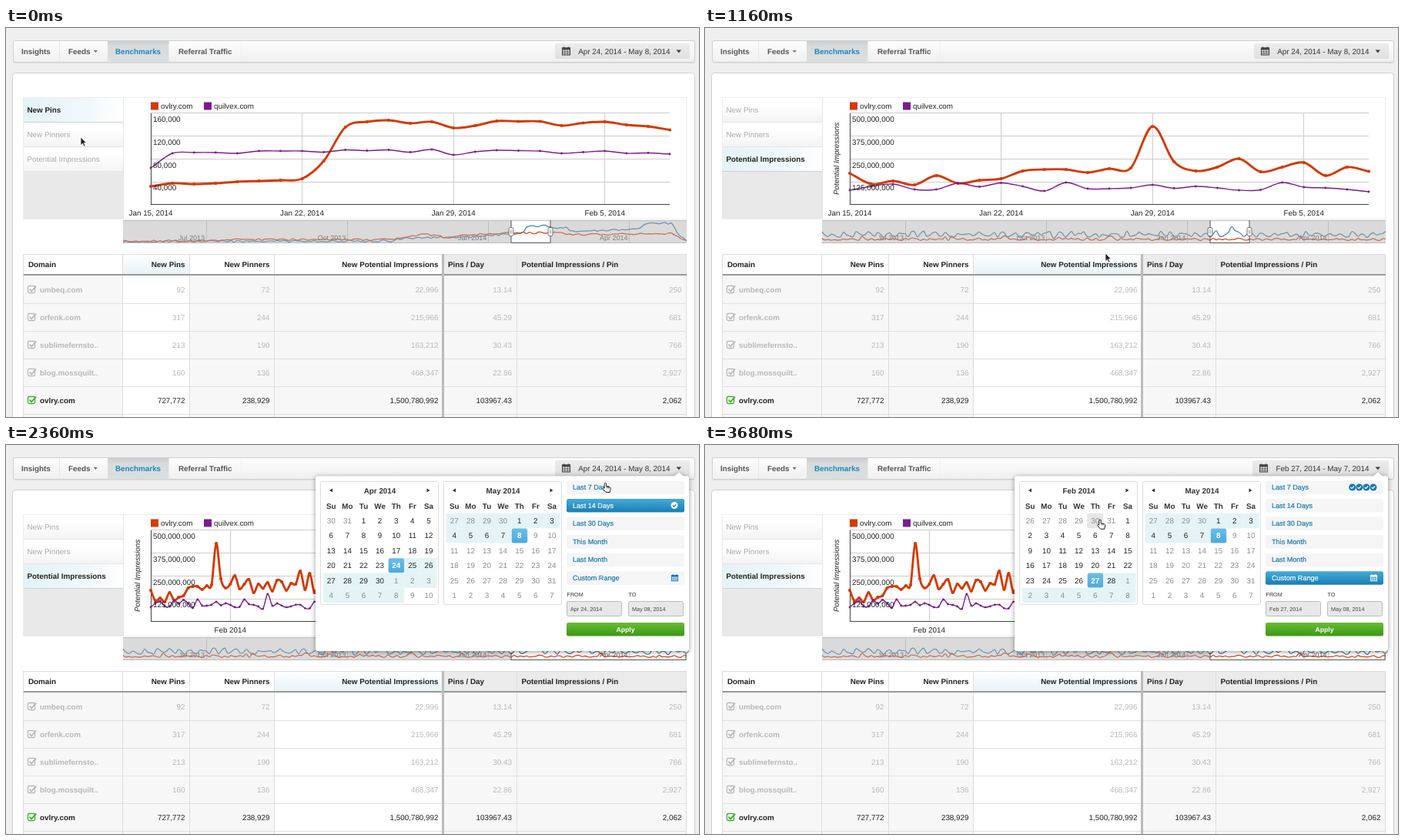
Recreate the animation shown at these times as an HTML page. Size 900 by 506 pixels, loop 3720 ms.

```html
<!DOCTYPE html>
<html lang="en">
<head>
<meta charset="utf-8">
<title>Benchmarks</title>
<style>
html, body { margin: 0; width: 100%; height: 100%; overflow: hidden; background: #efefef; }
svg { display: block; font: 9.85px "Liberation Sans", Arial, sans-serif; text-rendering: geometricPrecision; }
text { white-space: pre; }
.pop { filter: drop-shadow(0 1px 3px rgba(0, 0, 0, .4)); }
</style>
</head>
<body>
<svg id="stage" width="900" height="506" viewBox="0 0 900 506">
  <defs>
    <linearGradient id="bar" x2="0" y2="1"><stop stop-color="#fdfdfd"/><stop offset="1" stop-color="#f0f0f0"/></linearGradient>
    <linearGradient id="tab" x2="0" y2="1"><stop stop-color="#c9cdcf"/><stop offset=".25" stop-color="#d8dbdc"/><stop offset="1" stop-color="#dcdfe0"/></linearGradient>
    <linearGradient id="item" x2="0" y2="1"><stop offset=".3" stop-color="#fff"/><stop offset="1" stop-color="#f4f4f4"/></linearGradient>
    <linearGradient id="pick"><stop stop-color="#e3f3f8"/><stop offset=".65" stop-color="#f1f8fc"/><stop offset="1" stop-color="#fff"/></linearGradient>
    <linearGradient id="head" x2="0" y2="1"><stop stop-color="#fff"/><stop offset="1" stop-color="#e6f3f8"/></linearGradient>
    <linearGradient id="button" x2="0" y2="1"><stop stop-color="#ececec"/><stop offset="1" stop-color="#e0e0e0"/></linearGradient>
    <linearGradient id="cell" x2="0" y2="1"><stop stop-color="#6abfe9"/><stop offset="1" stop-color="#4fa9dc"/></linearGradient>
    <linearGradient id="blue" x2="0" y2="1"><stop stop-color="#45acd9"/><stop offset="1" stop-color="#1a7db3"/></linearGradient>
    <linearGradient id="green" x2="0" y2="1"><stop stop-color="#69bd35"/><stop offset="1" stop-color="#3b9714"/></linearGradient>
  </defs>
  <g id="page"></g><g id="menu"></g><g id="chart"></g><g id="mini"></g>
  <g id="table"></g><g id="date"></g><g id="picker"></g><g id="cursor"></g>
</svg>
<script>
const LOOP = 3720, STEP = 40;
const X0 = 188, X1 = 862, ORANGE = '#d43a05', PURPLE = '#7b1b8e';
const SITES = ['ovlry.com', 'quilvex.com'];
const MENU = ['New Pins', 'New Pinners', 'Potential Impressions'];
const MONTHS = ['Jan', 'Feb', 'Mar', 'Apr', 'May'];

// drawing helpers
const rect = (x, y, w, h, fill, more = '') => `<rect x="${x}" y="${y}" width="${w}" height="${h}" fill="${fill}" ${more}/>`;
const line = (x1, y1, x2, y2, stroke, w = 1) => `<path d="M${x1} ${y1}L${x2} ${y2}" stroke="${stroke}" stroke-width="${w}"/>`;
const path = (d, stroke, w, more = '') => `<path d="${d}" fill="none" stroke="${stroke}" stroke-width="${w}" ${more}/>`;
const shape = (d, fill, more = '') => `<path d="${d}" fill="${fill}" ${more}/>`;
const text = (x, y, s, fill = '#333', more = '') => `<text x="${x}" y="${y}" fill="${fill}" ${more}>${s}</text>`;
const BOLD = 'font-weight="bold" ', END = 'text-anchor="end" ', MID = 'text-anchor="middle" ';
const size = n => `font-size="${n}" `;
const snap = v => Math.floor(v) + .5;
const lerp = (a, b, p) => a + (b - a) * p;
const clamp = p => Math.max(0, Math.min(1, p));
const rnd = (i, seed) => { const v = Math.sin(i * 127.1 + seed * 311.7) * 43758.5453; return v - Math.floor(v); };

const shown = {};
function put(id, html) {
  if (shown[id] !== html) document.getElementById(id).innerHTML = shown[id] = html;
}

// series, as heights on the stage, one value a day
const pinsA = [206, 202, 203, 202, 200, 199, 198, 196, 173, 129, 122, 120, 124, 122, 130, 127, 121, 121.5, 121.5, 127, 123.5, 122, 126, 128, 132.5];
const pinsB = [182, 163, 162, 162, 163, 160, 160, 160, 161.5, 158.5, 159.5, 158.5, 161.5, 158, 165, 161, 159, 159.5, 160, 163, 161.5, 160, 163, 162.5, 164];
const folkA = [203, 198, 200, 199, 197, 196, 194.5, 193, 170, 133, 125, 121.5, 126.5, 124, 130.5, 129, 125, 124, 122, 129, 125, 124.5, 128, 127.5, 133];
const folkB = [190, 177, 177, 178.5, 178, 175.5, 175.5, 175, 176, 174.5, 175.5, 174.5, 175.5, 173, 178, 177, 175.5, 176, 175.5, 177.5, 176.5, 175, 178, 177.5, 179];
const viewA = [189, 203, 199, 204, 192, 202, 198, 196, 186, 184, 184, 188, 183, 182, 128, 174, 186, 181, 170, 187, 181, 175, 192, 181, 186.5];
const viewB = [211, 206, 203, 210, 210, 202, 206.5, 201.5, 206, 212, 201, 209, 209, 208, 204, 208.5, 206, 208, 211, 210.5, 201, 207, 208, 210, 213];
viewA.push(179, 190, 176, 178, 189, 180, 181, 164, 188, 167, 192, 178, 188, 174, 178, 158, 190, 169, 170);
viewB.push(194, 209, 206);
// later days: a short wave with noise on top
for (let i = 44; i <= 111; i++) viewA.push(i < 47 ? 215 : 190 - 10 * Math.cos(i * 1.55) + 20 * (rnd(i, 3) - .5));
for (let i = 28; i <= 111; i++) viewB.push(208.5 + 3 * Math.cos(i * 1.5) + 6 * (rnd(i, 5) - .5));
viewA[111] = 190; viewB[111] = 214;

const MODES = [
  { a: pinsA, b: pinsB, scale: ['160,000', '120,000', '80,000', '40,000'], title: '' },
  { a: folkA, b: folkB, scale: ['120,000', '90,000', '60,000', '30,000'], title: 'Pinners' },
  { a: viewA, b: viewB, scale: ['500,000,000', '375,000,000', '250,000,000', '125,000,000'], title: 'Potential Impressions' }
];

// [time, x, y, kind]
const TRACK = [
  [0, 97, 142, 'arrow'], [120, 76, 137, 'hand'], [480, 62, 138, 'hand'], [680, 60, 156, 'hand'],
  [760, 62, 166, 'hand'], [920, 66, 168, 'hand'], [1000, 160, 190, 'arrow'], [1160, 520, 293, 'arrow'],
  [1360, 707, 260, 'move'], [1480, 707, 258, 'move'], [1600, 790, 257, 'move'], [1720, 882, 258, 'move'],
  [1840, 882, 258, 'arrow'], [1960, 828, 100, 'arrow'], [2080, 836, 30, 'hand'], [2200, 836, 30, 'hand'],
  [2400, 764, 54, 'hand'], [2560, 764, 54, 'hand'], [2800, 675, 114, 'hand'], [2880, 675, 114, 'hand'],
  [3040, 422, 57, 'hand'], [3280, 422, 57, 'hand'], [3400, 508, 174, 'hand'], [3500, 508, 174, 'hand'],
  [3680, 513, 97, 'hand'], [LOOP, 513, 97, 'hand']
];
function pointer(t) {
  const k = TRACK.findIndex((s, i) => t < TRACK[i + 1][0]);
  const [t0, x, y, kind] = TRACK[k], [t1, u, v] = TRACK[k + 1], p = (t - t0) / (t1 - t0);
  return { x: lerp(x, u, p), y: lerp(y, v, p), kind };
}

function curve(pts) {
  let d = `M${pts[0].x} ${pts[0].y}`;
  for (let i = 0; i < pts.length - 1; i++) {
    const b = pts[i], c = pts[i + 1], a = pts[i - 1] || b, e = pts[i + 2] || c;
    const dx = (c.x - b.x) / 3;
    const sb = (c.y - a.y) / (c.x - a.x || 1), sc = (e.y - b.y) / (e.x - b.x || 1);
    d += `C${[b.x + dx, b.y + sb * dx, c.x - dx, c.y - sc * dx, c.x, c.y].map(n => n.toFixed(2))}`;
  }
  return d;
}

function drawChart(t, mode) {
  const { a, b, scale, title } = MODES[mode];
  let n0 = 24, n1 = 24, p = 0;
  if (t >= 1880) { n0 = 43; n1 = 111; p = clamp((t - 1880) / 160); }
  else if (t >= 1580) { n1 = 43; p = clamp((t - 1580) / 180); }
  const at = i => lerp(X0 + (X1 - X0) * Math.min(1, i / n0), X0 + (X1 - X0) * i / n1, p);
  const points = ys => Array.from({ length: n1 + 1 }, (_, i) =>
    ({ x: at(i), y: i > n0 ? lerp(ys[n0], ys[i], p) : ys[i] }));
  const dots = pts => pts.map(q => `M${q.x.toFixed(2)} ${q.y.toFixed(2)}h.01`).join('');
  const ticks = n1 == 111 && p == 1
    ? [[17, 'Feb 2014'], [45, 'Mar 2014'], [76, 'Apr 2014'], [106, 'May 2014']]
    : [[0, 'Jan 15, 2014'], [7, 'Jan 22, 2014'], [14, 'Jan 29, 2014'], [21, 'Feb 5, 2014']];

  let s = '';
  for (let i = 0; i < 4; i++) s += line(X0, snap(110.8 + i * 29.85), X1, snap(110.8 + i * 29.85), '#ccc');
  for (const [d, label] of ticks) {
    const x = at(d);
    if (d) s += line(snap(x), 111, snap(x), 230, '#ccc');
    s += text(x, 243.5, label, '#222', MID);
  }
  s += line(X0, 229.5, X1, 229.5, '#444') + line(X0 + .5, 111, X0 + .5, 230, '#444');
  for (const [ys, color, w, r] of [[a, ORANGE, 2.9, 4.2], [b, PURPLE, 1.4, 2.8]]) {
    const pts = points(ys);
    s += path(curve(pts), color, w, 'stroke-linejoin="round"') + path(dots(pts), color, r, 'stroke-linecap="round"');
  }
  scale.forEach((v, i) => s += text(191, 122 + i * 29.75, v, '#222'));
  if (title) s += text(0, 0, title, '#222', MID + 'font-style="italic" transform="translate(174 170) rotate(-90)"');
  put('chart', s);
}

// overview strip
const strip = f => curve(Array.from({ length: 184 }, (_, i) => ({ x: 152 + i * 4, y: f(152 + i * 4, i) })));
const along = (knots, x) => {
  const k = Math.max(1, knots.findIndex(q => q[0] >= x)), [a, b] = knots[k - 1], [c, d] = knots[k];
  return lerp(b, d, (x - a) / (c - a));
};
const riseBlue = [[152, 278], [500, 277], [520, 273], [600, 272], [655, 268], [671, 266], [676, 258], [700, 257], [706, 260], [728, 260], [736, 265], [820, 262], [832, 254], [866, 254], [874, 271], [886, 278]];
const riseOrange = [[152, 277], [250, 277], [300, 275], [480, 275.5], [516, 273], [545, 268], [575, 273], [600, 269], [660, 266.5], [720, 266], [735, 269], [866, 267], [874, 272], [886, 278]];
const growth = {
  blue: strip((x, i) => along(riseBlue, x) + (rnd(i, 1) - .5) * 2.4),
  orange: strip((x, i) => along(riseOrange, x) + (rnd(i, 2) - .5) * 2.2)
};
const views = {
  blue: strip((x, i) => 268.5 + 2 * Math.cos(x * .43) + (rnd(i, 7) - .5) * 6 - 15 * Math.exp(-(((x - 685.5) / 2.4) ** 2))),
  orange: strip((x, i) => 275 + (rnd(i, 8) - .5) * 3 - 3 * (rnd(i, 9) > .94))
};

function drawMini(t, mode, cur) {
  const end = t < 1480 ? 707 : t < 1720 ? cur.x + 1 : 883;
  const data = mode == 2 ? views : growth;
  let s = rect(152, 250, 732, 30, '#fff');
  ['Jul 2013', 'Oct 2013', 'Jan 2014', 'Apr 2014'].forEach((m, i) => {
    const x = 260 + i * 183.2;
    s += line(snap(x), 250, snap(x), 280, '#ccc') + text(x - 2, 276, m, '#555', END + size(9));
  });
  s += path(data.blue, '#4a83b5', 1.3) + path(data.orange, '#dc4c1c', 1.3);
  s += rect(152, 250, 504, 30, '#aaa', 'opacity=".43"') + rect(end, 250, 884 - end, 30, '#aaa', 'opacity=".43"');
  s += path('M152 250.5H884M152 279.5H884', '#bbb', 1) + path(`M656 250V279.5H${end}V250`, '#555', 1);
  for (const x of [656, end]) {
    s += rect(x - 3, 259.5, 6, 11, '#fff', 'rx="2" stroke="#666" stroke-width=".9"');
    s += path(`M${x - .8} 262.5v5M${x + .8} 262.5v5`, '#777', .6);
  }
  put('mini', s);
}

function drawMenu(mode, cur) {
  let s = '';
  MENU.forEach((m, i) => {
    const y = 91 + i * 32, on = i == mode;
    const hover = cur.kind == 'hand' && cur.x < 152 && cur.y >= y && cur.y < y + 32;
    s += rect(23, y, 129, 31, on ? 'url(#pick)' : 'url(#item)') + line(23, y + 31.5, 152, y + 31.5, on ? '#ccd3d6' : '#e6e6e6');
    s += text(27.5, y + 19, m, on ? '#222' : hover ? '#333' : '#aaa', on ? BOLD : '');
  });
  put('menu', s);
}

const EDGES = [23, 152, 239, 349, 568, 663.5, 884];
const HEADS = ['Domain', 'New Pins', 'New Pinners', 'New Potential Impressions', 'Pins / Day', 'Potential Impressions / Pin'];
const ROWS = [
  ['umbeq.com', '92', '72', '22,996', '13.14', '250'],
  ['orfenk.com', '317', '244', '215,966', '45.29', '681'],
  ['sublimefernsto..', '213', '190', '163,212', '30.43', '766'],
  ['blog.mossquilt..', '160', '136', '468,347', '22.86', '2,927'],
  [SITES[0], '727,772', '238,929', '1,500,780,992', '103967.43', '2,062']
];
function drawTable(mode) {
  let s = rect(23, 322, 861, 184, '#f7f7f7') + rect(23, 294, 545, 27, '#fff') + rect(568, 294, 316, 27, '#ebebeb');
  const x = EDGES[mode + 1], w = EDGES[mode + 2] - x;
  s += rect(x, 294, w, 27, 'url(#head)') + rect(x, 322, w, 184, '#fff');
  HEADS.forEach((h, i) => {
    const right = i > 0 && i < 4;
    s += text(right ? EDGES[i + 1] - 6.5 : EDGES[i] + 6, 311, h, '#222', BOLD + (right ? END : ''));
  });
  for (let y = 358.5; y < 506; y += 36) s += line(23, y, 884, y, '#e0e0e0');
  ROWS.forEach((row, r) => {
    const y = 340 + r * 36, on = r == 4, ink = on ? '#222' : '#b8b8b8', mark = on ? '#3fae29' : '#b8b8b8';
    s += rect(28.5, y - 4.5, 9, 9, '#fff', `rx="1.5" stroke="${mark}" stroke-width="1.3"`);
    s += path(`M30.5 ${y - .5}l2.6 2.8 6-6.6`, mark, 1.8);
    row.forEach((v, i) => s += i ? text(EDGES[i + 1] - 6.5, y + 3.5, v, ink, END) : text(44, y + 4, v, ink, BOLD));
  });
  for (const e of EDGES) s += e == 568 ? '' : line(snap(e - .5), 294, snap(e - .5), 506, '#ddd');
  s += line(23, 294.5, 884, 294.5, '#ddd') + line(23, 321, 884, 321, '#999', 2) + line(567.5, 294, 567.5, 506, '#bbb', 3);
  put('table', s);
}

// date picker; days are counted from 1 January
const day = n => new Date(2014, 0, n);
const stamp = n => `${MONTHS[day(n).getMonth()]} ${day(n).getDate()}, 2014`;
const field = n => stamp(n).replace(/ (\d),/, ' 0$1,');
const TO = 128;
function pickState(t) {
  const month = t < 2480 ? 3 : t < 3080 ? 4 : t < 3160 ? 3 : t < 3240 ? 2 : 1;
  if (t < 2480) return { from: 114, pick: 1, month };
  return t < 3440 ? { from: 121, pick: 0, month } : { from: 58, pick: 5, month };
}
const icon = (x, y, c, k = 1) => `<g transform="translate(${x} ${y}) scale(${k})">` +
  rect(.5, 1.5, 10, 9, 'none', `stroke="${c}" stroke-width="1.1"`) + rect(0, 1, 11, 3, c) +
  path('M2.5 0v3M8.5 0v3', c, 1.6) + path('M3.8 4v6M7.2 4v6M1 6.2h9M1 8.4h9', c, .7) + '</g>';

function drawDate(t, st) {
  const label = `${stamp(st.from)} - ${t < 3440 ? stamp(TO) : stamp(TO - 1)}`;
  const x = st.from == 114 ? 742 : st.from == 121 ? 744 : 740;
  put('date', rect(x - 29, 20, 917 - x, 20, 'url(#button)', 'rx="2"') + icon(x - 20, 24.5, '#444') +
    text(862.5, 33.5, label, '#333', END) + shape('M870.5 28.5h6.5l-3.25 4z', '#444'));
}

function calendar(left, month, st, cur) {
  const c0 = left + 14.3, first = [1, 32, 60, 91, 121][month], start = first - day(first).getDay();
  let s = rect(left + .5, 47.5, 153, 160, '#fff', 'rx="2" stroke="#ddd"');
  s += text(left + 77.5, 63, MONTHS[month] + ' 2014', '#333', BOLD + MID);
  s += shape(`M${left + 16} 56.5v5l-4-2.5z`, '#333') + shape(`M${left + 138.5} 56.5v5l4-2.5z`, '#333');
  ['Su', 'Mo', 'Tu', 'We', 'Th', 'Fr', 'Sa'].forEach((d, i) => s += text(c0 + i * 21.1, 82.5, d, '#333', BOLD + MID));
  for (let i = 0; i < 42; i++) {
    const n = start + i, x = c0 + i % 7 * 21.1, y = 98.5 + Math.floor(i / 7) * 19.4;
    const picked = n == (left < 500 ? st.from : TO);
    const hover = Math.abs(cur.x - x) < 10.5 && Math.abs(cur.y - y) < 9.7;
    if (picked) s += rect(x - 10, y - 9.5, 20.5, 19, 'url(#cell)', 'rx="2.5"');
    else if (hover) s += rect(x - 10.5, y - 9.7, 21.1, 19.4, '#e6e6e6', 'rx="2"');
    else if (n >= st.from && n <= TO) s += rect(x - 10.6, y - 9.7, 21.2, 19.4, '#e4f4f6');
    const live = day(n).getMonth() == month && n <= TO;
    s += text(x, y + 3.5, day(n).getDate(), picked ? '#fff' : live ? '#222' : '#8c8c8c', MID + (picked ? BOLD : ''));
  }
  return s;
}

function drawPicker(t, st, cur) {
  if (t < 2160) return put('picker', '');
  let s = '<g class="pop">' + shape('M405 40.5H868l6-5 6 5h4q3 0 3 3V265q0 3-3 3H405q-3 0-3-3V43.5q0-3 3-3z', '#fff') + '</g>';
  s += calendar(408, st.month, st, cur) + calendar(568, 4, st, cur);
  ['Last 7 Days', 'Last 14 Days', 'Last 30 Days', 'This Month', 'Last Month', 'Custom Range'].forEach((m, i) => {
    const y = 55 + i * 23.55, on = i == st.pick, ink = on ? '#fff' : '#1577b3';
    s += rect(728, y - 8.5, 153, 17.5, on ? 'url(#blue)' : '#f5f5f5', 'rx="2.5"');
    s += text(736, y + 3.2, m, ink, size(9.1) + `stroke="${ink}" stroke-width=".2"`);
    if (i == 5) s += icon(864, y - 4.5, ink, .82);
    const ticks = i == 0 && st.pick == 5 ? 4 : on && i < 5 ? 1 : 0;
    for (let k = 0; k < ticks; k++) {
      const x = 868 - k * 9.1;
      s += `<circle cx="${x}" cy="${y}" r="4.5" fill="${ink}"/>` + path(`M${x - 2.2} ${y}l1.6 1.7 2.8-3.2`, on ? '#1577b3' : '#fff', 1.2);
    }
  });
  [['FROM', 728, st.from], ['TO', 808, TO]].forEach(([label, x, n]) => {
    s += text(x + .5, 197, label, '#333', size(7.2));
    s += rect(x + .5, 203.5, 71, 19, '#e8e8e8', 'rx="2" stroke="#bbb"') + text(x + 5, 215.6, field(n), '#444', size(7.2));
  });
  s += rect(728, 231, 153, 17.5, 'url(#green)', 'rx="2.5"') + text(804.5, 243, 'Apply', '#fff', BOLD + MID + size(8.6));
  put('picker', s);
}

const CURSORS = {
  arrow: shape('M0 0V10.5L2.5 8.2 4.3 12 6 11.2 4.3 7.6H7.4z', '#2b1c2e', 'stroke="#fff" stroke-width=".7"'),
  hand: shape('M-1.2.8Q0-.8 1.2.8V4.8L5.6 5.8Q7 6.3 6.8 8L5.8 12.3H.6L-3.4 7.4Q-3.2 5.6-1.2 7z', '#fff', 'stroke="#222" stroke-width="1"') +
    path('M2.4 5.2v2.2M4.2 5.6v2', '#222', .7),
  move: shape('M0-5L2.4-2.4H1V-1H2.4V-2.4L5 0 2.4 2.4V1H1V2.4H2.4L0 5-2.4 2.4H-1V1H-2.4V2.4L-5 0-2.4-2.4V-1H-1V-2.4H-2.4z', '#2b1c2e', 'stroke="#fff" stroke-width=".4"')
};

function drawPage() {
  let s = rect(9.5, 16.5, 885, 28, 'url(#bar)', 'rx="2.5" stroke="#cfcfcf"') + line(10, 45.5, 894, 45.5, '#ddd');
  s += rect(132, 17, 79.5, 27.5, 'url(#tab)') + line(69.5, 17, 69.5, 44, '#e8e8e8') + line(305.5, 17, 305.5, 44, '#f0f0f0');
  [['Insights', 20], ['Feeds', 81], ['Benchmarks', 142], ['Referral Traffic', 224]].forEach(([m, x], i) =>
    s += text(x, 33.5, m, i == 2 ? '#1c86c0' : '#555', BOLD));
  s += shape('M113.5 29h5.5l-2.75 3z', '#777');
  s += rect(8.5, 58.5, 886, 460, '#fff', 'rx="4" stroke="#d0d0d0"');
  s += rect(23, 186, 129, 62, '#e9e9e9') + rect(22.5, 90.5, 861, 158, 'none', 'stroke="#ececec"') + line(152.5, 91, 152.5, 248, '#e6e6e6');
  s += rect(188, 96.5, 10, 10, ORANGE) + text(201, 105, SITES[0], '#222');
  s += rect(257, 96.5, 10, 10, PURPLE) + text(270, 105, SITES[1], '#222');
  put('page', s);
}

function draw(t) {
  const cur = pointer(t), st = pickState(t), mode = t < 320 ? 0 : t < 840 ? 1 : 2;
  drawMenu(mode, cur);
  drawChart(t, mode);
  drawMini(t, mode, cur);
  drawTable(mode);
  drawDate(t, st);
  drawPicker(t, st, cur);
  put('cursor', `<g transform="translate(${cur.x.toFixed(1)} ${cur.y.toFixed(1)})">${CURSORS[cur.kind]}</g>`);
}

drawPage();
const begin = performance.now();
function tick() {
  const t = (performance.now() - begin) % LOOP;
  draw(Math.floor(t / STEP) * STEP);
  requestAnimationFrame(tick);
}
tick();
</script>
</body>
</html>
```
